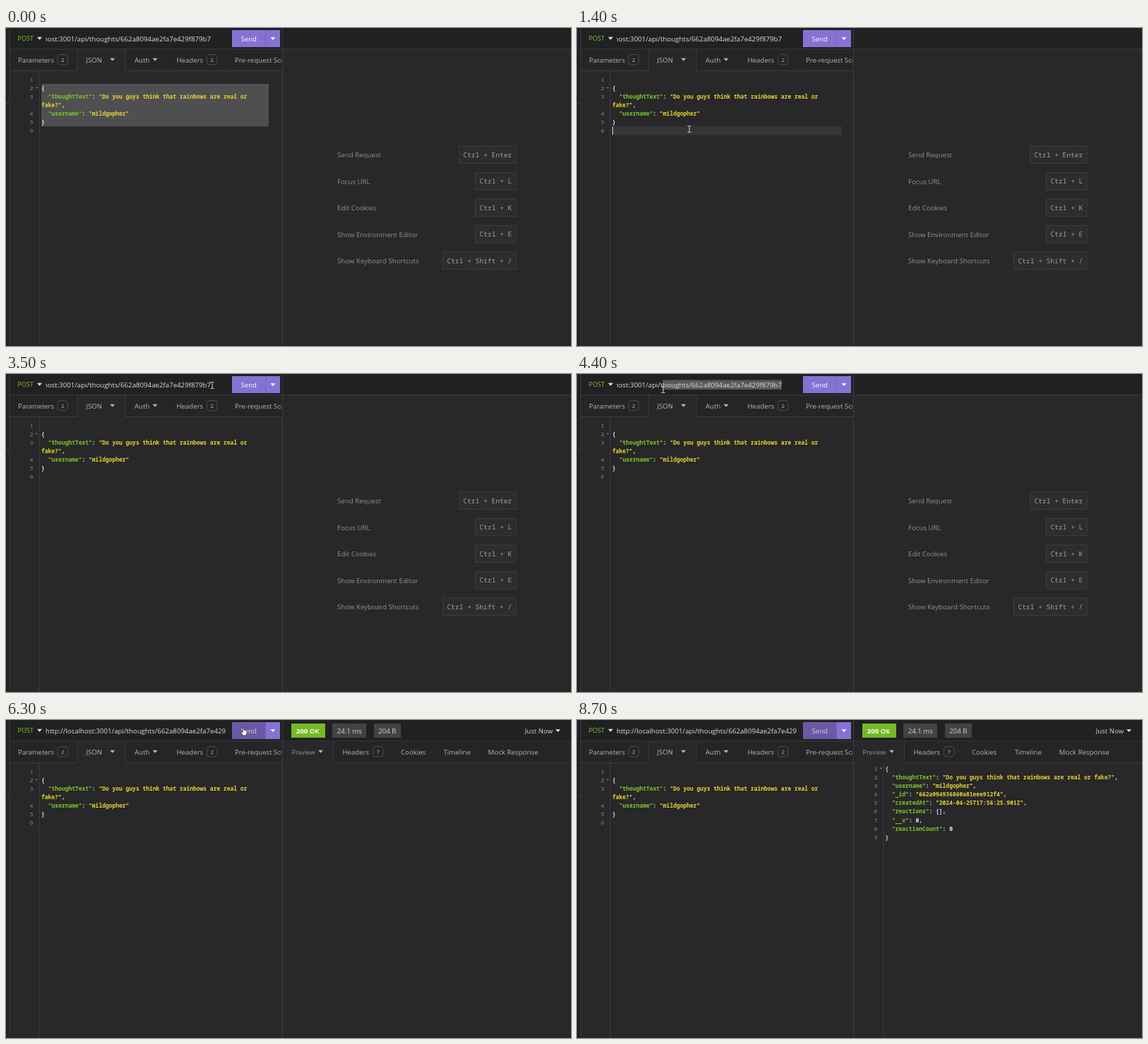
An HTML page that plays this animation: 800 px wide and 450 px high, repeating every 8.8 s.

```html
<!DOCTYPE html>
<html lang="en">
<head>
<meta charset="utf-8">
<title>API client</title>
<style>
  html, body { margin: 0; width: 100%; height: 100%; overflow: hidden; background: #282729; }
  svg { display: block; width: 100vw; height: 100vh; }
  text { white-space: pre; font: 9.65px "Open Sans", "Noto Sans", sans-serif; }
  .code { font: 700 7.96px "Noto Sans Mono", "DejaVu Sans Mono", monospace; }
  .num { font: 7.96px "Noto Sans Mono", "DejaVu Sans Mono", monospace; }
  .key { font: 9.55px "Noto Sans Mono", "DejaVu Sans Mono", monospace; }
</style>
</head>
<body>
<svg id="stage" viewBox="0 0 800 450">
  <clipPath id="urlClip"><rect x="56" y="2" width="255" height="26"/></clipPath>
  <clipPath id="leftClip"><rect x="0" y="0" width="390" height="450"/></clipPath>
</svg>
<script>
const LOOP = 8800, STEP = 100;
const GREEN = '#7cc62a', YELLOW = '#e3d530', WHITE = '#e2e2e2', SOFT = '#b5b5b6', DIM = '#929293';
const LINE = '#3d3c3f', BAR = '#212023', PAGE = '#282729', TABS = '#252427';
const SELECT = '#4f4e51', ACTIVE = '#363538', PURPLE = '#8572d2', HOVER = '#6a5aa6';
const stage = document.getElementById('stage');

function add(parent, tag, attrs, content) {
  const node = document.createElementNS('http://www.w3.org/2000/svg', tag);
  for (const name in attrs) node.setAttribute(name, attrs[name]);
  if (content !== undefined) node.textContent = content;
  parent.appendChild(node);
  return node;
}
const group = (attrs = {}, parent = stage) => add(parent, 'g', attrs);
const rect = (g, x, y, width, height, fill, more) => add(g, 'rect', { x, y, width, height, fill, ...more });
const text = (g, x, y, str, fill = SOFT, more) => add(g, 'text', { x, y, fill, ...more }, str);
const triangle = (g, x, y, fill = SOFT, s = 3.5) =>
  add(g, 'path', { d: `M${x - s} ${y - s / 2}h${2 * s}l${-s} ${s * 1.1}z`, fill });
const show = (node, on) => node.setAttribute('visibility', on ? 'visible' : 'hidden');

function badge(g, x, n) {
  rect(g, x, 37.5, 14.5, 14.5, 'none', { rx: 4, stroke: '#4b4a4d' });
  text(g, x + 7.25, 47.8, n, SOFT, { 'text-anchor': 'middle', style: 'font-size:8px' });
}

// One run of code made of [string, colour] pairs.
function code(g, x, y, ...runs) {
  const line = add(g, 'text', { x, y: y + 2.8, class: 'code' });
  for (const [str, fill] of runs) add(line, 'tspan', { fill }, str);
}
function pair(g, x, y, key, value, tail = '', fill = YELLOW) {
  code(g, x, y, [`"${key}"`, GREEN], [': ', WHITE], [value, fill], [tail, WHITE]);
}
const lineNumber = (g, x, y, n) =>
  text(g, x, y + 2.8, n, '#8b8b8c', { class: 'num', 'text-anchor': 'end' });

const row = i => 73 + 12.07 * i;
const rowTop = i => 66.9 + 12.07 * i;

// Background and rules
const base = group();
rect(base, 0, 0, 800, 450, PAGE);
rect(base, 0, 0, 800, 29.5, BAR);
rect(base, 0, 0, 5, 450, BAR);
rect(base, 5, 30, 386, 30, TABS);
rect(base, 101, 30, 68, 31, PAGE);
rect(base, 5, 29.5, 795, 1, LINE);
rect(base, 5, 60, 96, 1, LINE);
rect(base, 169, 60, 222, 1, LINE);
rect(base, 100.5, 30, 1, 30, LINE);
rect(base, 168.5, 30, 1, 30, LINE);
rect(base, 0, 106, 5, 1, LINE);
rect(base, 4.5, 0, 1, 450, LINE);
rect(base, 391, 0, 1, 450, LINE);
rect(base, 46.5, 61, 1, 389, LINE);

// Request bar
const left = group({ 'clip-path': 'url(#leftClip)' });
text(left, 16.5, 18.3, 'POST', GREEN, { style: 'font-size:9.1px' });
triangle(left, 47.5, 14.6, WHITE);
const urlBox = group({ 'clip-path': 'url(#urlClip)' }, left);
const urlSelect = rect(urlBox, 290, 8.5, 0, 13.5, '#58575a');
const url = text(urlBox, 56, 19, 'http://localhost:3001/api/thoughts/662a8094ae2fa7e429f879b7', '#dcdcdc',
  { style: 'font-size:9.68px' });
const send = rect(left, 320, 3, 47.5, 24, PURPLE);
rect(left, 367.5, 3, 20.5, 24, PURPLE);
rect(left, 367, 3, 1, 24, '#7563bb');
const sendText = text(left, 332.5, 18.8, 'Send', '#fff');
triangle(left, 378, 15, '#fff');

// Request tabs
text(left, 17, 48.7, 'Parameters', SOFT, { style: 'font-size:9.45px' });
badge(left, 73, 2);
text(left, 113.5, 48.5, 'JSON');
triangle(left, 150.7, 44.6);
text(left, 182, 48.7, 'Auth');
triangle(left, 211, 44.6);
text(left, 241.5, 48.7, 'Headers');
badge(left, 284.5, 2);
text(left, 324, 48.7, 'Pre-request Script');

// Request editor
const active = rect(left, 50, 0, 325, 12.1, ACTIVE);
const selectMain = rect(left, 50, 0, 322, 0, SELECT);
const selectTail = rect(left, 50, rowTop(5), 5, 12.1, SELECT);
[0, 1, 2, 4, 5, 6].forEach((r, i) => lineNumber(left, 38.5, row(r), i + 1));
triangle(left, 43.3, row(1) - 0.4, '#79787a', 2);
code(left, 50, row(1), ['{', WHITE]);
pair(left, 59.8, row(2), 'thoughtText', '"Do you guys think that rainbows are real or');
code(left, 50, row(3), ['fake?"', YELLOW], [',', WHITE]);
pair(left, 59.8, row(4), 'username', '"mildgopher"');
code(left, 50, row(5), ['}', WHITE]);
const caret = rect(left, 50, 0, 1, 11.5, '#d8d8d8');

// Shortcut list
const hints = group();
[['Send Request', 'Ctrl + Enter', 641], ['Focus URL', 'Ctrl + L', 664], ['Edit Cookies', 'Ctrl + K', 664],
 ['Show Environment Editor', 'Ctrl + E', 664], ['Show Keyboard Shortcuts', 'Ctrl + Shift + /', 618]]
  .forEach(([label, keys, x], i) => {
    const y = 179.3 + 37.5 * i;
    text(hints, 469, y + 3.8, label, DIM, { style: 'font-size:9.7px' });
    rect(hints, x + .5, y - 12.3, 721.5 - x, 24.5, '#2d2c2f', { stroke: LINE });
    text(hints, x + 6.5, y + 3.4, keys, '#a0a0a1', { class: 'key' });
  });

// Response bar and tabs
const head = group();
rect(head, 392, 30.5, 408, 30, TABS);
rect(head, 392, 30.5, 71, 30.5, PAGE);
rect(head, 463, 60, 337, 1, LINE);
rect(head, 463, 30, 1, 30, LINE);
rect(head, 404, 5, 48, 20, '#75ba24');
const status = text(head, 410.8, 18.7, '', '#fff');
add(status, 'tspan', { 'font-weight': 700 }, '200');
add(status, 'tspan', { 'font-weight': 600 }, ' OK');
rect(head, 462, 5, 48, 20, '#434245');
text(head, 468.8, 18.7, '24.1 ms', '#d2d2d2');
rect(head, 521, 5, 38, 20, '#434245');
text(head, 527.3, 18.7, '204 B', '#d2d2d2');
text(head, 734.8, 18.7, 'Just Now', '#d2d2d2');
triangle(head, 781.5, 15, WHITE);
text(head, 404.5, 48.7, 'Preview', DIM, { style: 'font-size:9.2px' });
triangle(head, 445.5, 44.6, SOFT);
text(head, 476.5, 48.7, 'Headers');
badge(head, 519.5, 7);
text(head, 559, 48.7, 'Cookies');
text(head, 619.5, 48.7, 'Timeline');
text(head, 682.5, 48.7, 'Mock Response', SOFT, { style: 'font-size:9.75px' });

// Response body
const reply = group();
const replyRow = i => 69 + 12.12 * i;
rect(reply, 433.5, 61, 1, 389, LINE);
triangle(reply, 430.3, replyRow(0) - 0.4, '#79787a', 2);
for (let i = 0; i < 9; i++) lineNumber(reply, 425.3, replyRow(i), i + 1);
code(reply, 436.5, replyRow(0), ['{', WHITE]);
[['thoughtText', '"Do you guys think that rainbows are real or fake?"', ','],
 ['username', '"mildgopher"', ','],
 ['_id', '"662a994936860a81eee912f4"', ','],
 ['createdAt', '"2024-04-25T17:56:25.901Z"', ','],
 ['reactions', '[]', ',', WHITE],
 ['__v', '0', ',', WHITE],
 ['reactionCount', '0', '', WHITE]]
  .forEach((item, i) => pair(reply, 446, replyRow(i + 1), ...item));
code(reply, 436.5, replyRow(8), ['}', WHITE]);

// Pointers, both centred on the origin
const beam = group();
add(beam, 'path', { d: 'M-2.5-4.5h2l.5.5.5-.5h2M-2.5 4.5h2l.5-.5.5.5h2M0-4V4', fill: 'none', stroke: '#d0d0d0', 'stroke-width': 1 });
const hand = group();
add(hand, 'path', {
  d: 'M-1.8-5q1-1 1.8 0v3.2l3.2.7q1 .4 1 1.5v2.2L3 6h-4.6L-4 2.2q-.8-1.4.3-1.5l1.9 1.2z',
  fill: '#fff', stroke: '#222', 'stroke-width': .8
});

// Pointer path: time, x, y
const PATH = [
  [200, 152, 146], [1400, 159, 143], [1700, 57, 134], [2200, 54, 130], [2500, 52, 118], [2800, 51, 86],
  [3100, 51, 86], [3500, 292, 16], [3700, 290, 16], [4400, 122, 22], [4900, 96, 20], [5300, 96, 20],
  [5800, 335, 15], [6400, 337, 16], [7100, 495, 298], [7300, 495, 310], [7800, 560, 465]
];
function pointer(t) {
  const i = PATH.findIndex(p => p[0] > t);
  if (i < 1) return null;
  const [a, b] = [PATH[i - 1], PATH[i]];
  const k = (t - a[0]) / (b[0] - a[0]), e = k * k * (3 - 2 * k);
  return { x: a[1] + (b[1] - a[1]) * e, y: a[2] + (b[2] - a[2]) * e };
}

function drawEditor(t, at) {
  const dragging = t >= 1700 && t < 3500;
  const atEnd = t >= 900 && t < 1700;
  const top = dragging ? Math.max(1, Math.round((at.y - 73) / 12.07)) : 1;
  const selected = dragging && top < 5;
  const resting = atEnd || (dragging && !selected);
  const line = atEnd ? 6 : 5;
  show(active, resting);
  show(caret, resting);
  active.setAttribute('y', rowTop(line));
  caret.setAttribute('y', rowTop(line) + .3);
  caret.setAttribute('x', atEnd ? 50 : 55);
  show(selectMain, t < 900 || selected);
  show(selectTail, selected);
  selectMain.setAttribute('y', rowTop(top));
  selectMain.setAttribute('height', rowTop(t < 900 ? 6 : 5) - rowTop(top));
}

// Nearest character edge to a pointer position in the address.
function snap(x) {
  let best = 290;
  for (let i = 0; i < url.getNumberOfChars(); i++) {
    const edge = url.getStartPositionOfChar(i).x;
    if (Math.abs(edge - x) < Math.abs(best - x)) best = edge;
  }
  return best;
}
function drawUrl(t, at) {
  const sent = t >= 6200;
  url.setAttribute('x', sent ? 56 : 290);
  url.setAttribute('text-anchor', sent ? 'start' : 'end');
  const selecting = t >= 3700 && !sent;
  show(urlSelect, selecting);
  if (!selecting) return;
  const x = snap(t < 5300 ? at.x : 96);
  urlSelect.setAttribute('x', x);
  urlSelect.setAttribute('width', 290 - x);
}

function draw(time) {
  const t = Math.floor((time % LOOP) / STEP) * STEP;
  const at = pointer(t);
  const hover = t >= 5700;
  drawEditor(t, at);
  drawUrl(t, at);
  send.setAttribute('fill', hover ? HOVER : PURPLE);
  sendText.setAttribute('fill', hover ? '#d3cfe2' : '#fff');
  show(hints, t < 6200);
  show(head, t >= 6200);
  show(reply, t >= 6400);
  const onButton = at && at.x >= 320 && at.x < 388 && at.y < 27;
  show(beam, at && !onButton);
  show(hand, onButton);
  if (at) (onButton ? hand : beam).setAttribute('transform', `translate(${at.x} ${at.y})`);
}

const start = performance.now();
function tick() {
  draw(performance.now() - start);
  requestAnimationFrame(tick);
}
tick();
</script>
</body>
</html>
```
